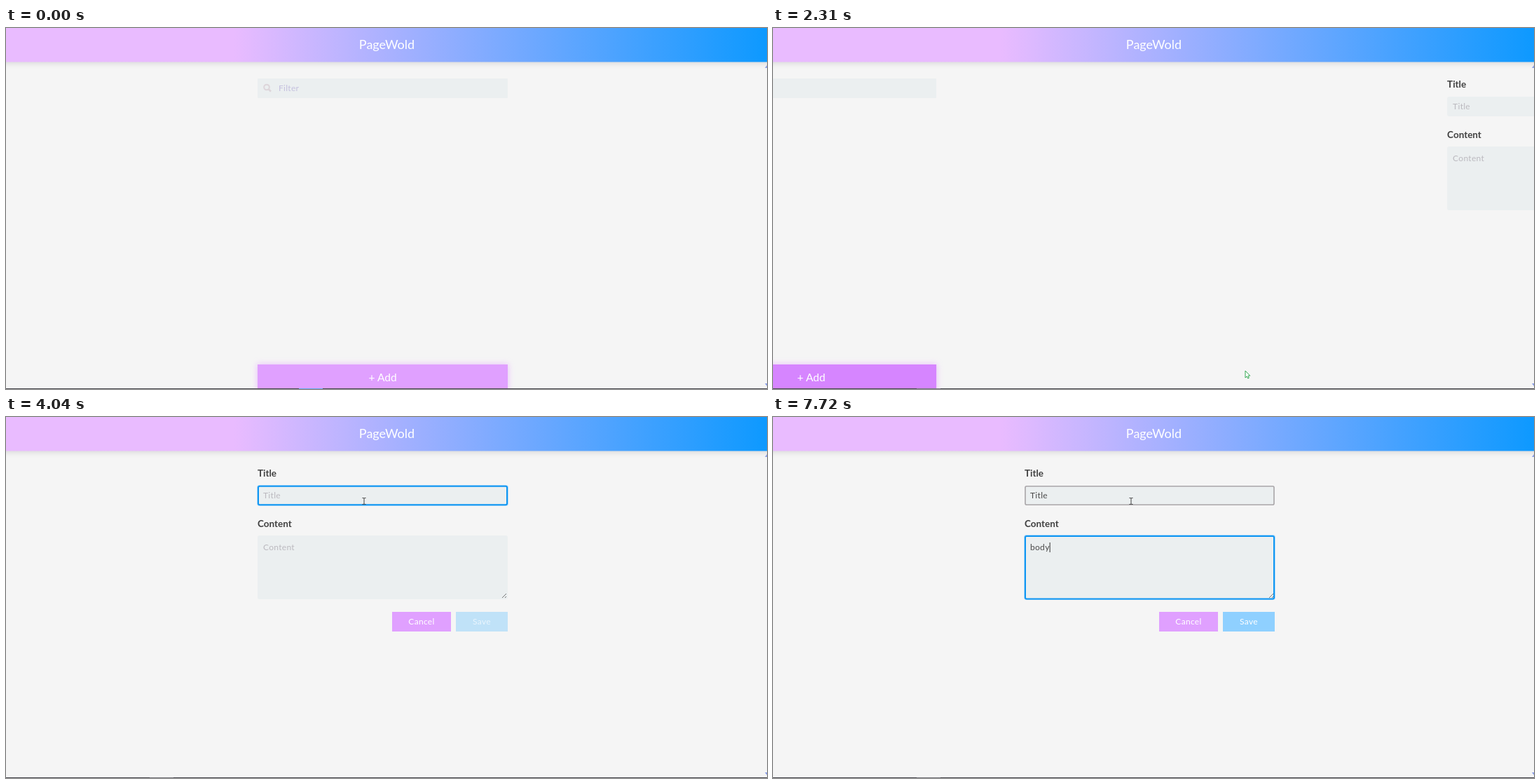
An HTML page for the animation above (8000 ms loop, 1086 by 515 pixels).

```html
<!DOCTYPE html>
<html lang="en">
<head>
<meta charset="utf-8">
<title>Notes</title>
<style>
  html, body { margin: 0; width: 100%; height: 100%; overflow: hidden; background: #f5f5f5; }
  svg { display: block; width: 1086px; height: 515px; }
  text { font: 12px Lato, sans-serif; letter-spacing: .3px; }
  .mid { text-anchor: middle; fill: #fff; }
  .label { font-size: 13.5px; font-weight: 700; letter-spacing: 0; fill: #414141; }
  .field { fill: #ebeff0; }
  .hint { fill: #bbb9bf; }
  .typed { fill: #4a4a4a; }
  .caret { fill: #333; }
  .edge { fill: none; stroke-width: 2; }
</style>
</head>
<body>
<svg viewBox="0 0 1086 515">
  <defs>
    <linearGradient id="sky">
      <stop offset=".3" stop-color="#e9bbff"/>
      <stop offset="1" stop-color="#0d99ff"/>
    </linearGradient>
    <filter id="soft" x="-20%" y="-60%" width="140%" height="220%"><feGaussianBlur stdDeviation="4"/></filter>
  </defs>
  <rect width="1086" height="515" fill="#f5f5f5"/>

  <g id="list">
    <rect class="field" x="359" y="72" width="357" height="28" rx="1"/>
    <g fill="none" stroke="#ddd5da" stroke-width="2">
      <circle cx="372" cy="84.5" r="3.8"/>
      <path d="M374.8 87.3 378 90.5" stroke-width="2.6"/>
    </g>
    <text x="389" y="90" fill="#c4c0de">Filter</text>
    <rect x="358" y="479" width="359" height="38" fill="#e0a0ff" opacity=".55" filter="url(#soft)"/>
    <rect id="add" x="359" y="480" width="357" height="35"/>
    <text class="mid" x="537.5" y="504" style="font-size:15.5px;letter-spacing:0">+ Add</text>
  </g>

  <g id="form">
    <text class="label" x="359" y="85">Title</text>
    <rect class="field" x="359" y="98" width="357" height="28" rx="3"/>
    <g id="title">
      <rect class="edge glow" x="359" y="98" width="357" height="28" rx="3"/>
      <rect class="edge line" x="360" y="98.8" width="355" height="26.4" rx="2"/>
      <text x="367" y="116"></text>
      <rect class="caret" y="105" width="1" height="14"/>
    </g>
    <text class="label" x="359" y="157">Content</text>
    <rect class="field" x="359" y="169" width="357" height="91" rx="3"/>
    <path d="M708 258 714 252M712 258 714 256" stroke="#777" fill="none"/>
    <g id="content">
      <rect class="edge glow" x="359" y="169" width="357" height="91" rx="3"/>
      <rect class="edge line" x="360" y="170" width="355" height="89.4" rx="2"/>
      <text x="367" y="190"></text>
      <rect class="caret" y="179" width="1" height="14"/>
    </g>
    <rect x="551" y="278" width="84" height="28" fill="#e0a0ff"/>
    <text class="mid" x="593" y="296">Cancel</text>
    <rect id="save" x="642" y="278" width="74" height="28"/>
    <text id="saveText" class="mid" x="679" y="296">Save</text>
  </g>

  <rect x="-10" y="0" width="1106" height="50" fill="#000" opacity=".13" filter="url(#soft)"/>
  <rect width="1086" height="48.5" fill="url(#sky)"/>
  <text class="mid" x="543.5" y="30" style="font-size:18px;letter-spacing:0">PageWold</text>
  <path d="M1083 57 1086 53V57ZM1083 507H1086V511Z" fill="#8a9ee8"/>
  <rect y="514" width="1086" height="1" fill="#4a4a50"/>
  <rect id="task" y="514" width="34" height="1"/>

  <path id="arrow" d="M.5 .5V10.5L2.8 8.4 4.2 11.4 5.8 10.7 4.5 7.6H7.3Z" fill="#fff"/>
  <path id="beam" d="M-2.5 -4.5H-.8L0 -4 .8 -4.5H2.5M0 -4V4M-2.5 4.5H-.8L0 4 .8 4.5H2.5" fill="none" stroke="#444"/>
</svg>
<script>
const $ = id => document.getElementById(id);
const LOOP = 8000, WIDTH = 1086;

// Pointer stops: time, x, y, shape
const pointer = [
  [0, 0, 0, ''],
  [520, 982, 512, 'arrow'], [596, 940, 508, 'arrow'], [672, 870, 502, 'arrow'],
  [748, 781, 497, 'arrow'], [824, 690, 498, 'arrow'], [900, 600, 500, 'arrow'],
  [976, 534, 501, 'arrow'], [1052, 560, 497, 'arrow'], [1128, 620, 492, 'arrow'],
  [1204, 660, 490, 'arrow'], [1280, 673.5, 488.5, 'arrow'],
  [2640, 738, 299, 'arrow'], [2720, 640, 240, 'beam'], [2790, 541, 186, 'beam'],
  [2870, 505, 76, 'arrow'], [2960, 508, 151, 'arrow'], [3110, 510, 136, 'arrow'],
  [3190, 511, 122, 'beam'], [3430, 511, 121, 'beam'], [3660, 511, 120, 'beam']
];

// Text and caret stops: time, text, caret shown
const titleKeys = [
  [0, '', 0], [3510, '', 1], [4040, '', 0], [4590, '', 1], [4680, 'T', 1], [4910, 'Ti', 1],
  [5070, 'Tit', 1], [5380, 'Titl', 1], [5930, 'Titl', 0], [6240, 'Title', 1], [6540, 'Title', 0]
];
const contentKeys = [
  [0, '', 0], [6540, '', 1], [7010, 'b', 1], [7260, 'bo', 1], [7560, 'bod', 1], [7720, 'body', 1]
];

const at = (stops, t) => stops.findLast(stop => stop[0] <= t);
const within = (t, from, to) => t >= from && t < to;
const show = (node, on) => node.setAttribute('visibility', on ? 'visible' : 'hidden');
const move = (node, x, y = 0) => node.setAttribute('transform', `translate(${x} ${y})`);

function drawField(id, hint, keys, t, focused, hovered) {
  const [glow, line, text, caret] = $(id).children;
  const [, value, caretOn] = at(keys, t);
  glow.style.stroke = focused ? '#0d99ff55' : 'none';
  line.style.stroke = focused ? '#1096f2' : hovered ? '#aaa6a9' : 'none';
  line.style.strokeWidth = focused ? 2 : 1.6;
  text.textContent = value || hint;
  text.setAttribute('class', value ? 'typed' : 'hint');
  caret.setAttribute('x', 367 + (value ? text.getComputedTextLength() : 0));
  caret.style.display = caretOn ? '' : 'none';
}

function draw(t) {
  // The slide and the press advance in 80 ms steps
  const stepped = 1910 + Math.floor((t - 1910) / 80) * 80;
  const progress = Math.min(1, Math.max(0, (stepped - 2174) / 465));
  const offset = WIDTH * (1 - progress) ** 1.7;
  move($('list'), offset - WIDTH);
  move($('form'), offset);
  show($('list'), progress < 1);
  show($('form'), progress > 0);

  const press = Math.min(1, Math.max(0, (stepped - 1830) / 320));
  $('add').style.fill = `rgb(${224 - 10 * press},${160 - 27 * press},255)`;
  $('task').setAttribute('x', t < 1910 ? 418 : 205);
  $('task').style.fill = t < 1910 ? '#6aa8ee' : '#77777d';

  drawField('title', 'Title', titleKeys, t, within(t, 3510, 6540), t >= 3190);
  drawField('content', 'Content', contentKeys, t, t >= 6540, within(t, 2720, 2870));
  $('save').style.fill = t < 7010 ? '#c0e2f8' : t < 7100 ? '#a8d9fb' : '#8fd0ff';
  $('saveText').style.fill = t < 7010 ? '#e9f5fd' : '#fff';

  const [, x, y, shape] = at(pointer, t);
  for (const id of ['arrow', 'beam']) {
    show($(id), shape === id);
    move($(id), x, y);
  }
  $('arrow').style.stroke = within(t, 2230, 2640) ? '#35a853' : '#333';
}

const start = performance.now();
function tick() {
  draw((performance.now() - start) % LOOP);
  requestAnimationFrame(tick);
}
tick();
</script>
</body>
</html>
```
